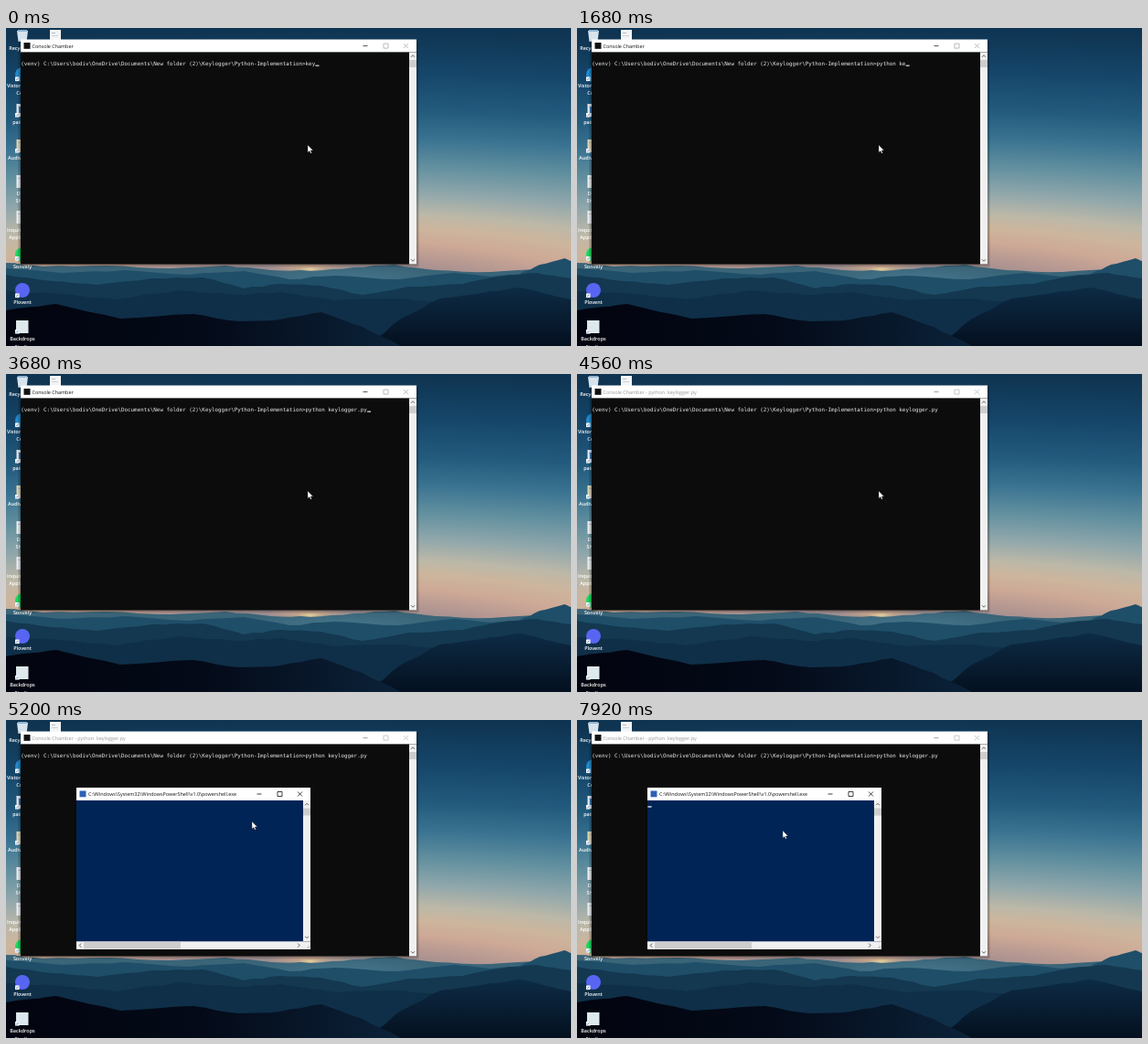
An HTML page that plays this animation: 618 px wide and 348 px high, repeating every 8 s.

```html
<!DOCTYPE html>
<html lang="en">
<head>
<meta charset="utf-8">
<title>Console session</title>
<style>
html, body { margin: 0; width: 100%; height: 100%; overflow: hidden; background: #0b2c47; }
svg { display: block; width: 618px; height: 348px; }
text { white-space: pre; text-rendering: geometricPrecision; font: 5.45px "Open Sans", sans-serif; }
.mono { font: 5.88px "DejaVu Sans Mono", monospace; fill: #ececec; }
.label { fill: #fff; text-anchor: middle; font-weight: 600; }
.line { fill: none; stroke-width: .8; }
</style>
</head>
<body>
<svg id="stage" viewBox="0 0 618 348">
  <defs>
    <radialGradient id="sky" cx="0" cy="0" r="300" gradientUnits="userSpaceOnUse"
      gradientTransform="translate(333 300) scale(5 1)">
      <stop offset=".1" stop-color="#8d8790"/>
      <stop offset=".17" stop-color="#b39691"/>
      <stop offset=".23" stop-color="#cda996"/>
      <stop offset=".28" stop-color="#cdb59c"/>
      <stop offset=".33" stop-color="#bcb8a8"/>
      <stop offset=".41" stop-color="#8ea6ab"/>
      <stop offset=".5" stop-color="#62909f"/>
      <stop offset=".6" stop-color="#3a7391"/>
      <stop offset=".7" stop-color="#235b7d"/>
      <stop offset=".84" stop-color="#15466a"/>
      <stop offset="1" stop-color="#0f3451"/>
    </radialGradient>
    <radialGradient id="sun">
      <stop offset="0" stop-color="#ffe3a0"/>
      <stop offset=".3" stop-color="#e8b787" stop-opacity=".6"/>
      <stop offset="1" stop-color="#d8a888" stop-opacity="0"/>
    </radialGradient>
    <radialGradient id="haze">
      <stop offset="0" stop-color="#4d8298" stop-opacity=".6"/>
      <stop offset="1" stop-color="#4d8298" stop-opacity="0"/>
    </radialGradient>
    <linearGradient id="near">
      <stop offset="0" stop-color="#02040f"/>
      <stop offset=".35" stop-color="#040a18"/>
      <stop offset=".7" stop-color="#0b2239"/>
    </linearGradient>
    <linearGradient id="slope" x2="0" y2="1">
      <stop offset="0" stop-color="#0d2b45"/>
      <stop offset="1" stop-color="#04101f"/>
    </linearGradient>
  </defs>
  <g id="desk"></g>
  <g id="cmd"></g>
  <g id="big"></g>
  <g id="small"></g>
  <path id="mouse" d="M0 0V8.2L1.9 6.5L3.1 9.2L4.4 8.6L3.2 6H5.8Z" fill="#fff" stroke="#222" stroke-width=".4"/>
</svg>
<script>
const LOOP = 8000, STEP = 80;
const ENTER = 4160, OPEN = 4560, SHRINK = 5040;
const CELL = 3.54, LEFT = 16.3;
const APP = "Console Chamber";
const PROMPT = "(venv) C:\\Users\\bodiv\\OneDrive\\Documents\\New folder (2)\\Keylogger\\Python-Implementation>";
const COMMAND = "python keylogger.py";
const SHELL = "C:\\Windows\\System32\\WindowsPowerShell\\v1.0\\powershell.exe";
const ERASE = [320, 400, 480];
const KEYS = [720, 800, 960, 1040, 1120, 1200, 1360, 1520, 1600, 1760,
  1920, 2000, 2160, 2240, 2400, 2480, 2720, 2880, 3040];
const MOVES = [[4800, 330, 128], [5200, 269, 111], [5680, 225, 121]];

const $ = id => document.getElementById(id);
const rect = (x, y, w, h, fill, more = "") =>
  `<rect x="${x}" y="${y}" width="${w}" height="${h}" fill="${fill}" ${more}/>`;
const text = (x, y, s, more = "") => `<text x="${x}" y="${y}" ${more}>${s}</text>`;
const line = (d, color) => `<path class="line" d="${d}" stroke="${color}"/>`;
const glow = (x, y, rx, ry, id) =>
  `<ellipse cx="${x}" cy="${y}" rx="${rx}" ry="${ry}" fill="url(#${id})"/>`;

let seed = 7;
const rand = () => (seed = seed * 16807 % 2147483647) / 2147483647 - .5;

// A ridge through a few peaks, roughened between them
function ridge(points, fill) {
  let d = `M${points[0][0]} 348`;
  points.forEach(([x, y], i) => {
    d += `L${x} ${y}`;
    const next = points[i + 1];
    if (!next) return;
    for (let k = 1; k < 4; k++) {
      const f = k / 4;
      d += `L${x + (next[0] - x) * f} ${y + (next[1] - y) * f + rand() * 1.6}`;
    }
  });
  return `<path d="${d}L618 348Z" fill="${fill}"/>`;
}

const page = (y, fill) => rect(11.5, y - 7, 13, 14, fill) + rect(13, y - 4, 9, .7, "#9fb3c4");
const badge = y => rect(10, y, 4.6, 4.6, "#f4f6f8") + line(`M11.2 ${y + 3.5}l2.2 -2.2`, "#2b6fc0");
const disc = (y, fill) => `<circle cx="18" cy="${y}" r="8" fill="${fill}"/>`;
const label = (y, s) => text(18, y, s, 'class="label"');

$("desk").innerHTML =
  rect(0, 0, 618, 348, "url(#sky)") + glow(333, 264, 50, 9, "sun") +
  ridge([[0, 257], [40, 261], [110, 260], [180, 263], [240, 260], [290, 265], [333, 266], [380, 262], [425, 259], [470, 265], [530, 267], [618, 262]], "#3a6478") +
  glow(370, 275, 110, 16, "haze") +
  ridge([[0, 263], [60, 268], [130, 265], [200, 270], [260, 266], [310, 275], [360, 271], [430, 275], [490, 268], [530, 272], [562, 269], [584, 259], [611, 252], [618, 255]], "#1f4e69") +
  ridge([[0, 270], [50, 277], [100, 281], [160, 274], [215, 273], [260, 285], [300, 280], [345, 282], [390, 292], [440, 283], [500, 280], [540, 272], [580, 268], [618, 274]], "#13384f") +
  ridge([[0, 288], [60, 291], [120, 297], [190, 287], [250, 292], [300, 289], [360, 298], [420, 296], [480, 300], [618, 300]], "#0f2f48") +
  ridge([[395, 348], [432, 318], [475, 296], [530, 288], [562, 284], [618, 297]], "url(#slope)") +
  ridge([[0, 309], [30, 305], [55, 302], [125, 318], [205, 313], [255, 321], [300, 319], [345, 311], [390, 327], [432, 348]], "url(#near)") +
  '<path d="M12 3H24L22.5 15H13.5Z" fill="#d7e3ec"/>' + rect(13, 2, 10, 2, "#8fb4d2") +
  rect(48, 2, 12, 12, "#f3f4f5") + rect(50, 5, 4, .8, "#a8b0b8") + rect(50, 8, 7, .8, "#c5cad0") +
  label(24, "Recycle Bin") +
  disc(51, "#2489ca") + badge(53.5) + label(65, "Vistoral Desk") + label(72.5, "Code") +
  page(90, "#dfe8f0") + rect(14, 86, 5, 7, "#3a78b8") + badge(93) + label(104.5, "painting") +
  page(129, "#e0d8b8") + badge(132) + label(144, "Audiven Pro") +
  page(168, "#eceff1") + label(183, "Data") + label(191, "Sheet") +
  page(207, "#eceff1") + label(223, "Inquiry Form") + label(231, "Application") +
  disc(248, "#1ed760") + badge(250) + label(262.8, "Sonvely") +
  disc(287, "#5865f2") + badge(290.5) + label(302, "Plovent") +
  rect(11, 320, 13.5, 14, "#dde9ec") + badge(330) + label(342, "Backdrops") + label(350.5, "Studio");

function buttons(right, y, ink, rest = ink) {
  const a = right - 58.5, b = right - 36, c = right - 14;
  return line(`M${a} ${y}h5`, ink) +
    line(`M${b} ${y - 2.5}h5v5h-5zM${c} ${y - 2.5}l5 5m0 -5l-5 5`, rest);
}

function scrollbar(x, y, h) {
  const m = x + 4;
  return rect(x, y, 8, h, "#f0f0f0") + rect(x, y + 8.5, 8, 8, "#cdcdcd") +
    line(`M${m - 2} ${y + 5.3}l2 -2l2 2M${m - 2} ${y + h - 5.3}l2 2l2 -2`, "#444");
}

function shadow(x, y, w, h) {
  return [1, 2, 3].map(k =>
    rect(x - k, y + 1, w + 2 * k, h + k - 1, "#000", 'opacity=".1" rx="2"')).join("");
}

// Title bar, body and upright scrollbar shared by every window
function frame(x, y, w, h, fill, icon, title, foot = 0) {
  return shadow(x, y, w, h) +
    rect(x, y, w, 14.2, "#fff") + rect(x, y + 14, w, h - 14, fill) +
    rect(x + 3.5, y + 3.5, 7, 6.8, icon) + title +
    scrollbar(x + w - 8, y + 14, h - 14 - foot);
}

$("cmd").innerHTML =
  frame(16, 12.5, 433, 246, "#0c0c0c", "#111", text(28.5, 21.9, APP, 'id="title"')) +
  `<g id="live">${buttons(449, 19.6, "#222", "#aaa")}</g><g id="idle">${buttons(449, 19.6, "#888", "#bbb")}</g>` +
  text(LEFT, 40.6, "", 'id="prompt" class="mono"') +
  rect(0, 0, 4, 1.1, "#f2f2f2", 'id="caret"');

const shellTitle = text(90, 83, SHELL, 'fill="#111"');
const shellCaret = rect(77.4, 94.3, 4.2, 1.3, "#eeedf0", 'class="blink"');

$("big").innerHTML =
  frame(77, 74, 549, 330, "#012456", "#2d62b5", shellTitle) +
  buttons(626, 81, "#222") + shellCaret;

$("small").innerHTML =
  frame(77, 74, 256, 177, "#012456", "#2d62b5", shellTitle, 9) +
  buttons(333, 81, "#111") +
  rect(77, 242.3, 256, 8.7, "#f0f0f0") + rect(85, 242.8, 106, 7.6, "#cdcdcd") +
  line("M82.2 244.6l-2 2l2 2M319.2 244.6l2 2l-2 2", "#333") +
  line("M329 250l3 -3M331 250l1 -1", "#aaa") + shellCaret;

const show = (el, on) => el.setAttribute("visibility", on ? "inherit" : "hidden");
const passed = (times, t) => times.filter(k => k <= t).length;

function typed(t) {
  const n = passed(KEYS, t);
  return n ? COMMAND.slice(0, n) : "key".slice(0, 3 - passed(ERASE, t));
}

function pointer(t) {
  const [a, b, c] = MOVES;
  if (t <= a[0]) return a.slice(1);
  if (t >= c[0]) return c.slice(1);
  const [from, to] = t < b[0] ? [a, b] : [b, c];
  const p = (t - from[0]) / (to[0] - from[0]);
  const e = from === a ? p * p * (1.6 - .6 * p) : 1 - (1 - p) ** 2;
  return [1, 2].map(i => from[i] + (to[i] - from[i]) * e);
}

function draw(t) {
  const blink = t < 200 || (t + 5965) % 1060 < 530;
  const entered = t >= ENTER, opened = t >= OPEN;
  const input = typed(t);

  $("prompt").textContent = PROMPT + input;
  $("title").textContent = APP + (entered ? " - python  keylogger.py" : "");
  $("title").setAttribute("fill", opened ? "#999" : "#111");
  show($("live"), !opened);
  show($("idle"), opened);

  const col = entered ? 0 : PROMPT.length + input.length;
  $("caret").setAttribute("x", LEFT + col * CELL);
  $("caret").setAttribute("y", entered ? 48.3 : 40.6);
  show($("caret"), blink && !opened);

  const p = Math.min(1, Math.max(0, (t - OPEN) / 240));
  const ease = 1 - (1 - p) ** 2, s = .93 + .07 * ease;
  $("big").setAttribute("opacity", ease);
  $("big").setAttribute("transform", `translate(351.5 239) scale(${s}) translate(-351.5 -239)`);
  show($("big"), opened && t < SHRINK);
  show($("small"), t >= SHRINK);
  document.querySelectorAll(".blink").forEach(el => show(el, blink));

  $("mouse").setAttribute("transform", `translate(${pointer(t).join(" ")})`);
}

const start = performance.now();
function tick() {
  const t = (performance.now() - start) % LOOP;
  draw(Math.floor(t / STEP) * STEP);
  requestAnimationFrame(tick);
}
tick();
</script>
</body>
</html>
```
